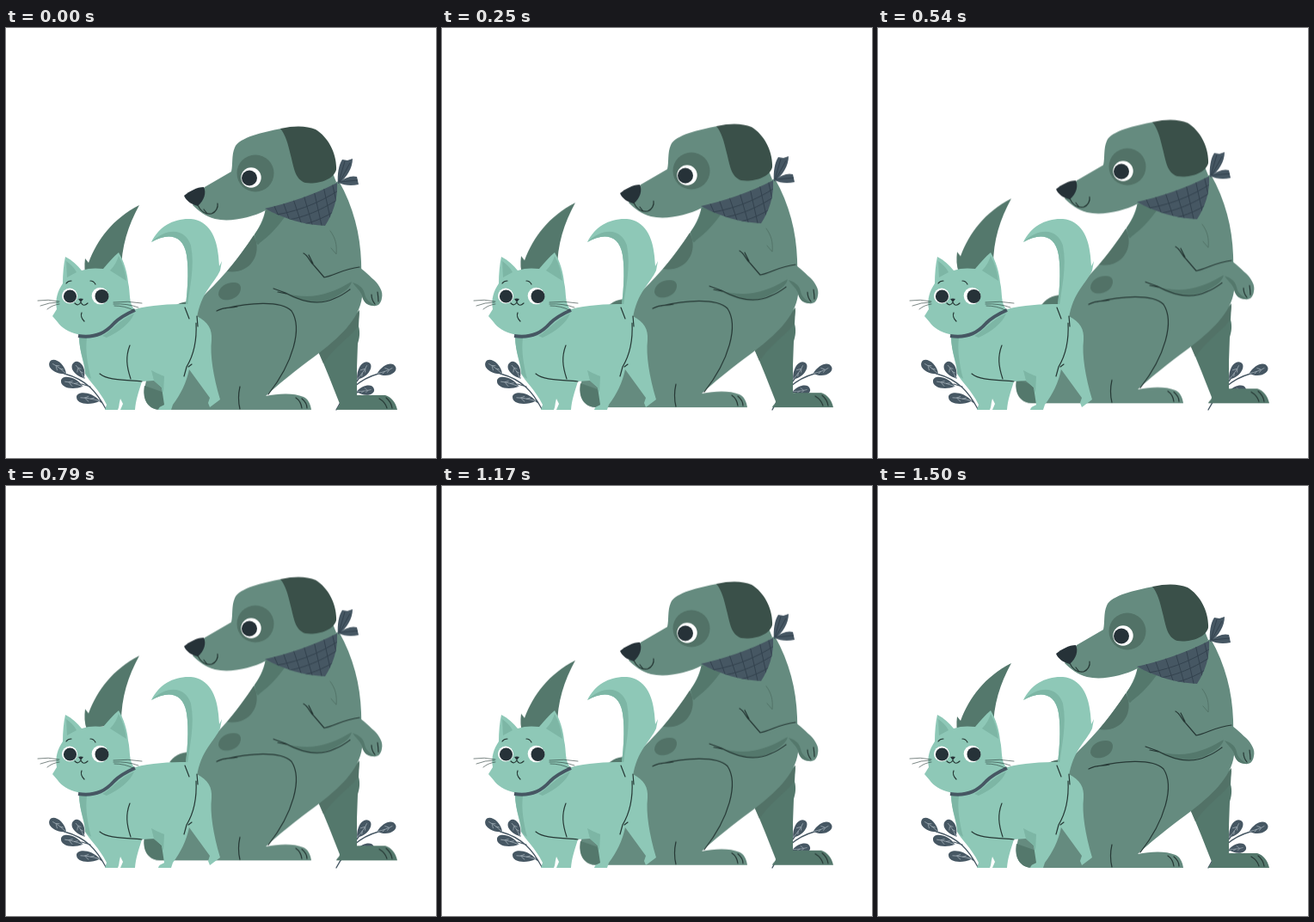
An HTML page for the animation above (1540 ms loop, 500 by 500 pixels).

```html
<!DOCTYPE html>
<html lang="en">
<head>
<meta charset="utf-8">
<title>Cat and dog</title>
<style>
  html, body { margin: 0; width: 100%; height: 100%; overflow: hidden; background: #fff; }
  svg { display: block; width: 100vw; height: 100vh; }
  .dog { animation: bob 770ms cubic-bezier(.37, 0, .63, 1) -48ms infinite alternate; }
  @keyframes bob { to { transform: translateY(-8.8px); } }
  .fur { fill: #658b7f; }
  .far { fill: #54786c; }
  .spot { fill: #527267; }
  .ear { fill: #3a5049; }
  .cloth { fill: #465763; }
  .ink { fill: #263238; }
  .white { fill: #fff; }
  .coat { fill: #8ec8b7; }
  .shade { fill: #7db6a5; }
  .line { fill: none; stroke: #263835; stroke-width: 1.2; stroke-linecap: round; stroke-linejoin: round; }
  .thin { stroke-width: .6; }
  .soft { stroke: #527267; stroke-width: .9; }
  .plaid { fill: none; stroke: #33424e; stroke-width: 1; }
  .stem { fill: none; stroke: #465763; stroke-width: 1.3; stroke-linecap: round; }
  .vein { fill: none; stroke: #a3b0b8; stroke-width: .7; }
</style>
</head>
<body>
<svg viewBox="0 0 500 500">
  <defs>
    <clipPath id="scarf"><path id="scarfShape" d="M301 210C328 204 358 194 385 180C386 200 380 216 371 230C348 229 323 222 301 210Z"/></clipPath>
    <g id="leaf">
      <path class="cloth" d="M0 0C-1 -7 14 -10 24 0C14 8 1 8 0 0Z"/>
      <path class="vein" d="M4 0C10 -1 16 -1 24 0M8 -.5L12 -3M9 0L13 3M14 -.5L18 -2.5"/>
    </g>
  </defs>

  <g id="plants">
    <path class="stem" d="M116 443C106 424 94 409 68 402M91 407L86 401M88 414L98 417M108 433L112 436"/>
    <use href="#leaf" transform="translate(51 388) rotate(37)"/>
    <use href="#leaf" transform="translate(79 389) rotate(57) scale(.9 1)"/>
    <use href="#leaf" transform="translate(64 410) rotate(15) scale(1.1 1)"/>
    <use href="#leaf" transform="translate(82 429) rotate(10) scale(1.15 1)"/>
    <path class="stem" d="M384 444C394 425 408 409 433 402M410 408L407 412M411 423L395 427"/>
    <use href="#leaf" transform="translate(422 389) rotate(125)"/>
    <use href="#leaf" transform="translate(453 394) rotate(160) scale(.95 1)"/>
    <use href="#leaf" transform="translate(428 420) rotate(173) scale(.85 .9)"/>
  </g>

  <g class="dog">
    <path class="far" d="M155 206C124 222 106 246 96 273L92 268C91 276 91 284 94 292L134 284C134 254 142 230 155 206Z"/>
    <path class="far" d="M362 374L411 328L410 347C412 354 411 361 409 367L408 395V427L441 427C448 429 453 435 455 444L384 444C385 441 388 440 388 437C380 417 372 395 362 374Z"/>
    <path class="spot" d="M364 378L411 330L409 347C400 360 384 369 369 390Z"/>
    <path class="far" d="M190 330C195 323 202 318 214 318V340Z"/>
    <path class="fur" d="M302 210C299 224 294 233 287 243C272 265 254 288 234 307C215 327 170 370 162 415C158 432 165 444 180 444L355 444C354 437 351 431 346 429C334 424 317 425 302 428C326 406 348 390 364 378C386 361 411 339 414 313L413 272C412 240 404 208 387 178Z"/>
    <path class="far" d="M161 416C158 432 165 444 180 444H186L184 424Z"/>
    <path class="far" d="M302 211L324 220C316 231 306 242 295 250C291 256 291 246 289 240C296 231 301 222 302 211Z"/>
    <path class="spot" d="M288 241C294 252 292 264 287 271C281 281 269 285 257 283C268 270 279 255 288 241Z"/>
    <path class="spot" d="M247 310C247 302 255 296 265 296C273 296 275 302 271 309C266 317 249 320 247 310Z"/>
    <path class="far" d="M322 308C342 313 358 314 377 307C389 303 394 299 402 295C400 305 382 315 365 319C350 322 335 314 322 308Z"/>
    <path class="fur" d="M370 291C384 288 395 281 406 276C413 278 421 287 428 293C434 299 439 307 437 314C436 321 432 324 427 323C420 323 416 319 414 312C407 306 402 299 400 290Z"/>
    <path class="far" d="M403 296C407 302 411 304 414 311C416 321 422 323 430 323C422 319 418 315 417 309C415 300 408 298 403 296Z"/>
    <path class="line" d="M346 262C352 265 353 272 358 276L370 290C382 288 392 280 411 278M352 264L357 274M311 303L325 308C343 318 363 324 383 314C391 311 396 307 400 304M316 307L326 309M425 310Q425 316 429 321M432 307Q433 314 433 318"/>
    <path class="line soft" d="M377 236C383 244 385 252 384 263L378 256"/>
    <path class="line" d="M245 329C254 324 260 326 269 324M255 326C281 320 319 316 332 329C345 349 334 389 305 426M272 417C270 426 270 435 272 443M337 430Q343 434 344 442M344 431Q350 436 350 442M434 431Q441 435 443 442M442 430Q448 435 449 442"/>

    <path class="fur" d="M231 185L262 167C264 159 262 148 266 139C271 127 300 121 320 117L362 124L384 179C365 195 334 207 302 212C285 221 260 226 243 222C232 219 224 213 217 206Z"/>
    <path class="ear" d="M319 117C337 113 350 114 360 118C375 127 385 147 384 165C380 178 360 182 348 180C336 176 335 163 331 148C328 135 325 124 319 117Z"/>
    <circle class="spot" cx="290" cy="169" r="21.5"/>
    <circle class="white" cx="285" cy="174" r="11.7"/>
    <circle class="ink" cx="283" cy="174.5" r="9"/>
    <path class="ink" d="M207 195C213 190 222 185 230 185C233 191 231 200 223 207C216 205 210 202 207 195Z"/>
    <path class="line" d="M223 206C226 213 232 217 239 216C244 214 247 209 246 204M230 211L234 216"/>

    <use class="cloth" href="#scarfShape"/>
    <g clip-path="url(#scarf)">
      <path class="plaid" d="M300 219C334 216 364 204 388 188M310 225C340 224 365 213 388 198M330 231C350 229 370 222 388 209M311 205L319 223M322 202L332 230M334 199L345 232M346 194L357 232M358 189L368 234M369 184L379 230M379 179L386 211"/>
    </g>
    <path class="cloth" d="M386 181C385 170 387 159 391 153L397 154L403 152C403 163 396 174 387 181Z"/>
    <path class="cloth" d="M387 180C394 174 402 171 408 173L410 182C401 184 393 183 387 180Z"/>
    <path class="plaid" d="M387 179L394 155M388 179L400 157M388 179L409 177"/>
  </g>

  <g id="cat">
    <path class="coat" d="M169 249C178 230 196 221 215 222C236 224 245 243 247 265L248 277L251 271L249 282C243 296 226 308 222 338L207 335C211 312 213 283 210 264C206 240 188 238 169 249Z"/>
    <path class="shade" d="M169 249C185 233 208 231 215 253C220 278 213 303 210 331L207 335C211 312 213 283 210 264C206 240 188 238 169 249Z"/>
    <path class="coat" d="M85 355L150 327C168 322 190 321 211 321L222 335C235 342 240 350 239 363C237 380 241 405 249 432L237 441L235 436L237 430L213 397C210 412 203 426 194 438L192 444H177C178 440 181 440 184 438L181 418L172 410L158 411C154 424 151 432 150 444H133L136 437L133 431C131 438 132 440 130 444H115L117 438C108 420 96 410 92 402C92 390 85 379 85 355Z"/>
    <path class="shade" d="M85 359L94 360C92 376 95 392 99 408C95 405 92 403 92 400C92 388 85 377 85 359ZM169 398C176 402 180 403 184 405L183 424L181 418L172 410Z"/>
    <path class="shade" d="M112 358C122 353 132 339 149 332C145 343 132 353 117 360Z"/>
    <path class="line" d="M144 369C139 382 140 393 145 408M109 402C119 410 137 409 158 411M221 343C222 362 219 379 210 394L207 405M208 325L213 338M222 335L223 347M212 394L216 391"/>

    <path class="coat" d="M66 297C66 286 67 275 69 266C77 270 83 276 88 282C96 279 105 279 113 280C119 273 125 266 131 261C137 271 141 284 142 296C145 308 142 320 150 328C134 334 123 351 114 356C104 360 92 360 83 356C73 354 64 348 60 342L54 335L59 327C57 315 60 306 66 297Z"/>
    <path class="shade" d="M70 271C76 275 80 280 82 284L71 290ZM121 282C126 277 129 271 131 265C136 274 139 284 140 294Z"/>
    <path d="M84 358C106 361 117 353 126 343C133 336 141 332 150 328" fill="none" stroke="#465763" stroke-width="4"/>
    <circle class="white" cx="74" cy="311.5" r="9"/>
    <circle class="ink" cx="74.5" cy="312" r="7.6"/>
    <circle class="white" cx="109.5" cy="311.5" r="9.8"/>
    <circle class="ink" cx="111.5" cy="312" r="8"/>
    <path class="ink" d="M84 315Q87 314 90 315L87 319Z"/>
    <path class="line" d="M80 320Q84 324 87 319Q90 325 95 320M70 297Q72 294 76 294M98 294Q102 294 104 298M88 331Q86 336 91 341"/>
    <path class="line thin" d="M62 318Q49 315 37 317M61 319Q50 319 40 323M62 321Q54 322 48 327M125 319Q142 317 158 320M125 321Q141 320 154 325M126 323Q138 323 148 328"/>
  </g>
</svg>
</body>
</html>
```
